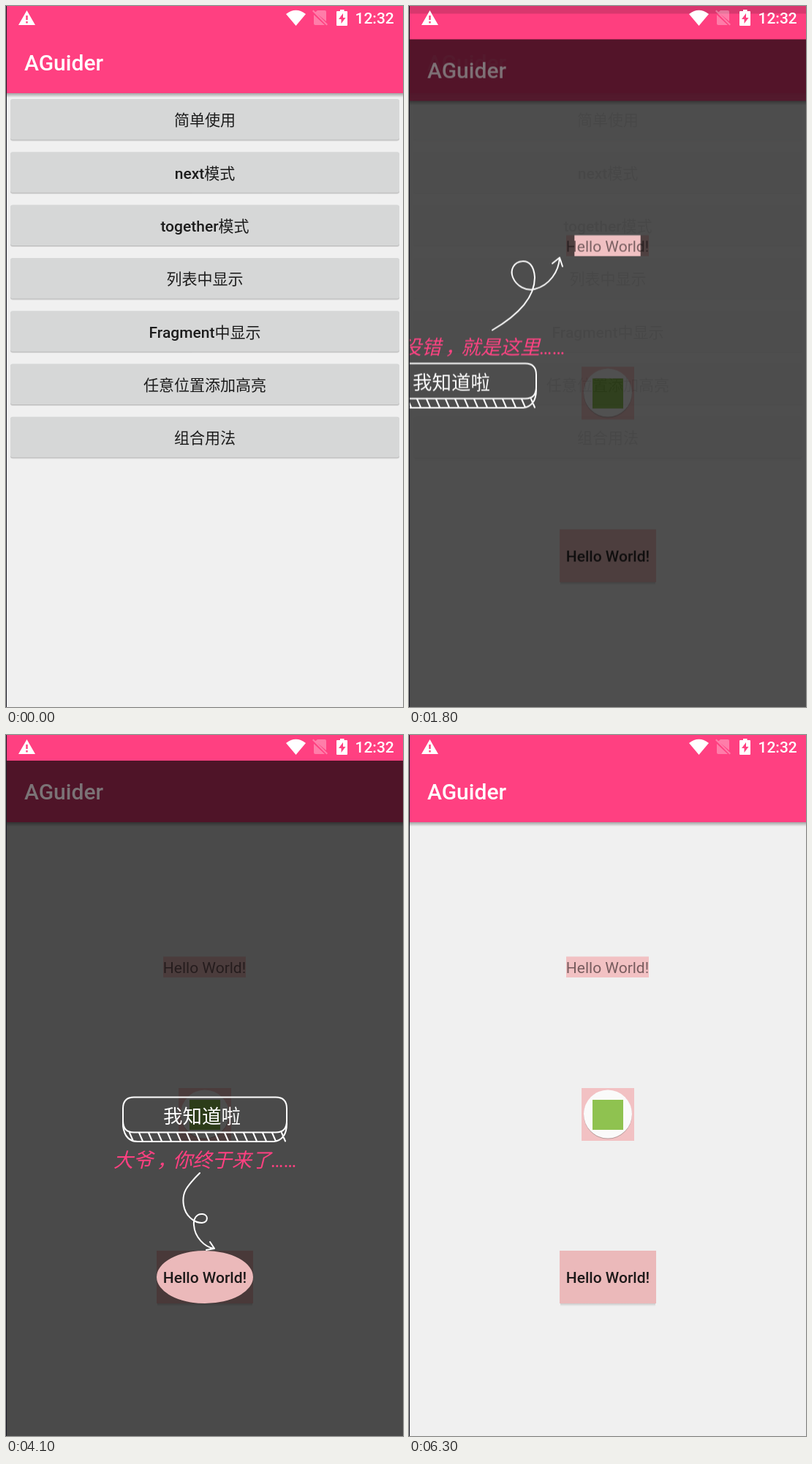
An HTML page for the animation above (7.8 s loop, 543 by 957 pixels).

```html
<!DOCTYPE html>
<html lang="zh-CN">
<head>
<meta charset="utf-8">
<style>
html, body { margin: 0; width: 100%; height: 100%; overflow: hidden; background: #f0f0f0; }
svg { display: block; width: 543px; height: 957px; }
text { font: 500 21px Roboto, "Noto Sans CJK SC", "Noto Sans CJK", sans-serif; }
.mid { text-anchor: middle; }
.title { font-size: 30px; }
.say { font-size: 27px; font-weight: 400; font-style: italic; fill: #ff4081; }
.hand { font-size: 26.5px; font-weight: 400; fill: #fff; }
.pen { fill: none; stroke: #fff; stroke-width: 2; stroke-linecap: round; stroke-linejoin: round; }
</style>
</head>
<body>
<svg viewBox="0 0 543 957">
  <defs>
    <linearGradient id="fade" x2="0" y2="1">
      <stop stop-opacity=".32"/><stop offset="1" stop-opacity="0"/>
    </linearGradient>
    <g id="ok">
      <path class="pen" stroke-width="2.2" d="M175 494.5H369Q384 494.5 384 510V527Q384 542.5 369 542.5H175Q160 542.5 160 527V510Q160 494.5 175 494.5Z"/>
      <path id="lip" class="pen"/>
      <text class="hand mid" x="268" y="530">我知道啦</text>
    </g>
  </defs>

  <g id="list">
    <rect width="543" height="957" fill="#f0f0f0"/>
    <rect width="543" height="119" fill="#ff4081"/>
    <rect y="119" width="543" height="6" fill="url(#fade)"/>
    <text class="title" x="25" y="88" fill="#fff">AGuider</text>
    <g id="buttons"></g>
    <rect id="lift" x="8" y="617" width="528" height="4" fill="url(#fade)"/>
    <rect id="press" x="6" y="561" width="532" height="55.5" rx="3"/>
    <rect id="shade" width="543" height="957" opacity=".15"/>
  </g>

  <g id="page">
    <rect width="543" height="957" fill="#f0f0f0"/>
    <rect width="543" height="119" fill="#ff4081"/>
    <rect y="119" width="543" height="6" fill="url(#fade)"/>
    <rect x="215" y="302.5" width="113" height="28.5" fill="#f2c1c3"/>
    <text class="mid" x="271.5" y="325" fill="#775c5e" style="font-weight:400">Hello World!</text>
    <rect x="236" y="482" width="72" height="72" fill="#f2c1c3"/>
    <circle cx="272" cy="518.5" r="33" fill="#b59a9a"/>
    <circle cx="272" cy="517.5" r="33" fill="#fafafa"/>
    <rect x="251" y="498" width="42" height="41" fill="#8fc250"/>
    <rect x="207" y="776" width="130" height="4" fill="url(#fade)" opacity=".5"/>
    <rect x="206" y="704" width="132" height="72" fill="#ebb9ba"/>
    <text class="mid" x="272" y="748" fill="#1d1919">Hello World!</text>
    <path id="dim" fill-rule="evenodd" fill-opacity=".69"/>
    <text id="title" class="title" x="25" y="88">AGuider</text>
    <g id="tip1">
      <path class="pen" d="M114 432C150 411 172 388 172 360C171 343 163 337 155 338C143 339 138 350 142 360C147 372 160 379 172 376C192 371 205 352 206 333M196 341L206 333L210 345"/>
      <text class="say" x="-10" y="465">没错<tspan dx="5">，</tspan><tspan dx="-5">就是这里……</tspan></text>
      <use href="#ok" x="-210" y="-17"/>
    </g>
    <g id="tip2">
      <path class="pen" stroke-width="1.7" d="M360 614C345 611 328 604 325 594C324 585 334 582 340 587C343 594 331 597 325 594C316 588 314 572 315 556M309 563L315 556L322 562"/>
      <text class="say" x="309" y="644">对对对<tspan dx="5">，</tspan><tspan dx="-5">你说的都对……</tspan></text>
      <use href="#ok" x="176" y="162"/>
    </g>
    <g id="tip3">
      <path class="pen" stroke-width="1.7" d="M265 598C247 616 240 625 243 642C245 655 256 666 268 666C277 665 277 655 269 654C261 653 256 660 257 669C258 686 272 699 284 701M279 692L285 701L274 703"/>
      <text class="say" x="147" y="590">大爷<tspan dx="5">，</tspan><tspan dx="-5">你终于来了……</tspan></text>
      <use href="#ok"/>
    </g>
  </g>

  <g fill="#fff">
    <path fill-rule="evenodd" d="M28.5 6L40 26H17ZM27.3 13V19H29.7V13ZM27.3 21V23.4H29.7V21Z"/>
    <path d="M383 11Q396.500 0.500 410 11L396.500 27Z"/>
    <path opacity=".32" d="M426 6H436Q438 6 438 8V21L423 8.500ZM421 12L436 26H423Q421 26 421 24ZM419 7L420.500 5.500L440 25L438.500 26.500Z"/>
    <path fill-rule="evenodd" d="M457 5H462.500V7H466Q467 7 467 8V26Q467 27 466 27H453Q452 27 452 26V8Q452 7 453 7H457ZM461 10L455 18H458.500V24L464.500 16H461Z"/>
    <text x="477.500" y="24">12:32</text>
  </g>
  <rect width="1" height="957" fill="#1b1b26"/>
</svg>
<script>
const el = id => document.getElementById(id);
const show = (id, on) => el(id).style.display = on ? '' : 'none';

const labels = ['简单使用', 'next模式', 'together模式', '列表中显示', 'Fragment中显示', '任意位置添加高亮', '组合用法'];
el('buttons').innerHTML = labels.map((label, i) => {
  const y = 127 + i * 72.3;
  const box = (dy, fill) => `<rect x="6" y="${y + dy}" width="532" height="55.500" rx="3" fill="${fill}"/>`;
  return box(2, '#dcdcdc') + box(1, '#bcbcbc') + box(0, '#d6d7d7') +
    `<text class="mid" x="272" y="${y + 36.3}" fill="#1c1c1c">${label}</text>`;
}).join('');

let lip = 'M160 528V534Q163 555 180 555H366Q384 553 384 530';
for (let x = 169; x < 378; x += 13) lip += `M${x} 543l5 11.500`;
el('lip').setAttribute('d', lip);

// Width share of a highlight that opens at step a and closes after step b
const grow = (n, a, b) =>
  n < a ? 0 : n > b ? Math.max(0, 1 - (n - b) / 2) : Math.min(1, (n - a + 1) * .4);

const rectHole = (cx, y, w, h) => w ? `M${cx - w / 2} ${y}h${w}v${h}h${-w}Z` : '';
const ovalHole = (cx, cy, rx, ry) =>
  rx ? `M${cx - rx} ${cy}a${rx} ${ry} 0 0 1 ${2 * rx} 0a${rx} ${ry} 0 0 1 ${-2 * rx} 0Z` : '';

function draw(n) {
  const entering = n < 20, guided = n < 63, together = n >= 50;
  show('list', entering);
  show('lift', n >= 13);
  show('shade', n >= 18);
  el('press').setAttribute('opacity', [.04, .08, .02, .02][n - 13] || 0);

  show('page', n >= 18);
  const dy = n === 18 ? 10.5 : n === 19 ? 2 : 0;
  el('page').setAttribute('transform', `translate(0 ${dy})`);
  el('page').setAttribute('opacity', n === 18 ? .97 : 1);
  el('title').setAttribute('fill', !guided ? '#fff' : together ? '#555053' : '#7b7376');

  show('dim', guided);
  const all = grow(n, 50, 62);
  const k1 = Math.max(all, grow(n, 17, 27));
  const k2 = Math.max(all, grow(n, 29, 37));
  const k3 = Math.max(all, grow(n, 39, 49));
  el('dim').setAttribute('d', `M0 ${together ? 0 : 35}H543V957H0Z` +
    rectHole(271.5, 302.5, 113 * k1, 28.5) +
    rectHole(272, 482, 72 * k2, 72) +
    ovalHole(272, 740, 66 * k3, 36));

  const shared = n >= 51 && guided;
  show('tip1', shared || n < 27);
  show('tip2', shared || n >= 30 && n < 37);
  show('tip3', shared || n >= 40 && n < 49);
}

function tick() {
  draw(Math.floor(performance.now() % 7800 / 100));
  requestAnimationFrame(tick);
}
tick();
</script>
</body>
</html>
```
